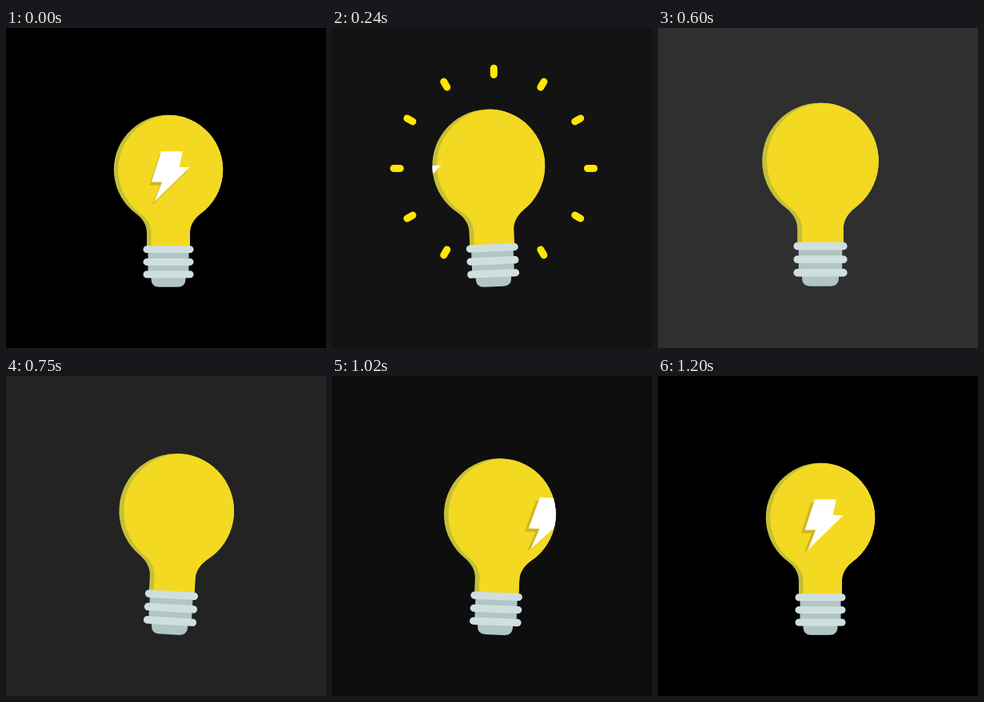
An HTML page that plays this animation: 400 by 400 pixels, repeating every 1.23 s.

```html
<!DOCTYPE html>
<html lang="en">
<head>
<meta charset="utf-8">
<title>Light bulb</title>
<style>
  html, body { margin: 0; width: 100%; height: 100%; overflow: hidden; background: #000; }
  svg { display: block; width: 100vw; height: 100vh; }
</style>
</head>
<body>
<svg viewBox="0 0 400 400">
  <defs>
    <path id="glass" d="M-27-50V-68C-27-78-33-86-40-91.5A68.2 68.2 0 1 1 40-91.5C33-86 27-78 27-68V-50Z"/>
    <path id="bolt" d="M-8-169.5H18.8L14.6-149.8H27.8L-16.5-106.5L-7-131.3H-20.3Z"/>
    <clipPath id="inside"><use href="#glass"/></clipPath>
  </defs>
  <rect id="bg" width="400" height="400"/>
  <g id="rays" stroke="#ffe600" stroke-width="9" stroke-linecap="round"></g>
  <g id="bulb">
    <use href="#glass" fill="#c5c036"/>
    <g clip-path="url(#inside)">
      <use href="#glass" x="5.5" fill="#f3d922"/>
      <use id="shadow" href="#bolt" y="4" fill="#d3b51d"/>
      <use id="flash" href="#bolt" fill="#fff"/>
    </g>
    <path d="M-25.5-51H25.5V-12H21.5V-10Q21.5 0 11.5 0H-11.5Q-21.5 0-21.5-10V-12H-25.5Z" fill="#b1c5c5"/>
    <path d="M-27-47H27M-27-31.4H27M-27-15.8H27" stroke="#cfdfe0" stroke-width="9" stroke-linecap="round"/>
  </g>
</svg>
<script>
const LOOP = 1230, STEP = 30, HALF = 600, RAYS_END = 330;
const $ = id => document.getElementById(id);

// Eleven rays, with a gap where the base sits.
const rays = [];
for (let i = -5; i <= 5; i++) {
  const line = document.createElementNS("http://www.w3.org/2000/svg", "line");
  line.setAttribute("transform", `translate(202.3 175.5) rotate(${i * 30})`);
  $("rays").append(line);
  rays.push(line);
}

// A soft swing to the left, then a wider one to the right that peaks early.
function tiltAt(t) {
  return t < HALF
    ? -2.6 * Math.sin(Math.PI * t / HALF)
    : 3.7 * Math.sin(Math.PI * (t / HALF - 1) ** .7);
}

// The bolt leaves to the left and comes back from the right.
function slideAt(t) {
  return t < HALF ? -1 - .35 * t : 1 + .305 * (2 * HALF - t);
}

function draw(t) {
  const glow = 1 - Math.abs(t - HALF) / HALF;
  const grey = Math.round(47 * glow);
  $("bg").setAttribute("fill", `rgb(${grey},${grey},${grey})`);

  const size = 1 + .067 * glow ** .8;
  $("bulb").setAttribute("transform",
    `translate(203 339) rotate(${tiltAt(t)}) scale(${size}) translate(0 -15.2)`);

  const x = slideAt(t);
  $("flash").setAttribute("x", x);
  $("shadow").setAttribute("x", x - 2.5 * (1 + t / (2 * HALF)));

  const end = 64 + .255 * t;
  const length = Math.min(11, .09 * (RAYS_END - t));
  $("rays").style.display = t > 0 && t < RAYS_END ? "" : "none";
  for (const ray of rays) {
    ray.setAttribute("y1", -end);
    ray.setAttribute("y2", length - end);
  }
}

const start = performance.now();
function tick() {
  const t = (performance.now() - start) % LOOP;
  draw(Math.floor(t / STEP) * STEP);
  requestAnimationFrame(tick);
}
tick();
</script>
</body>
</html>
```
